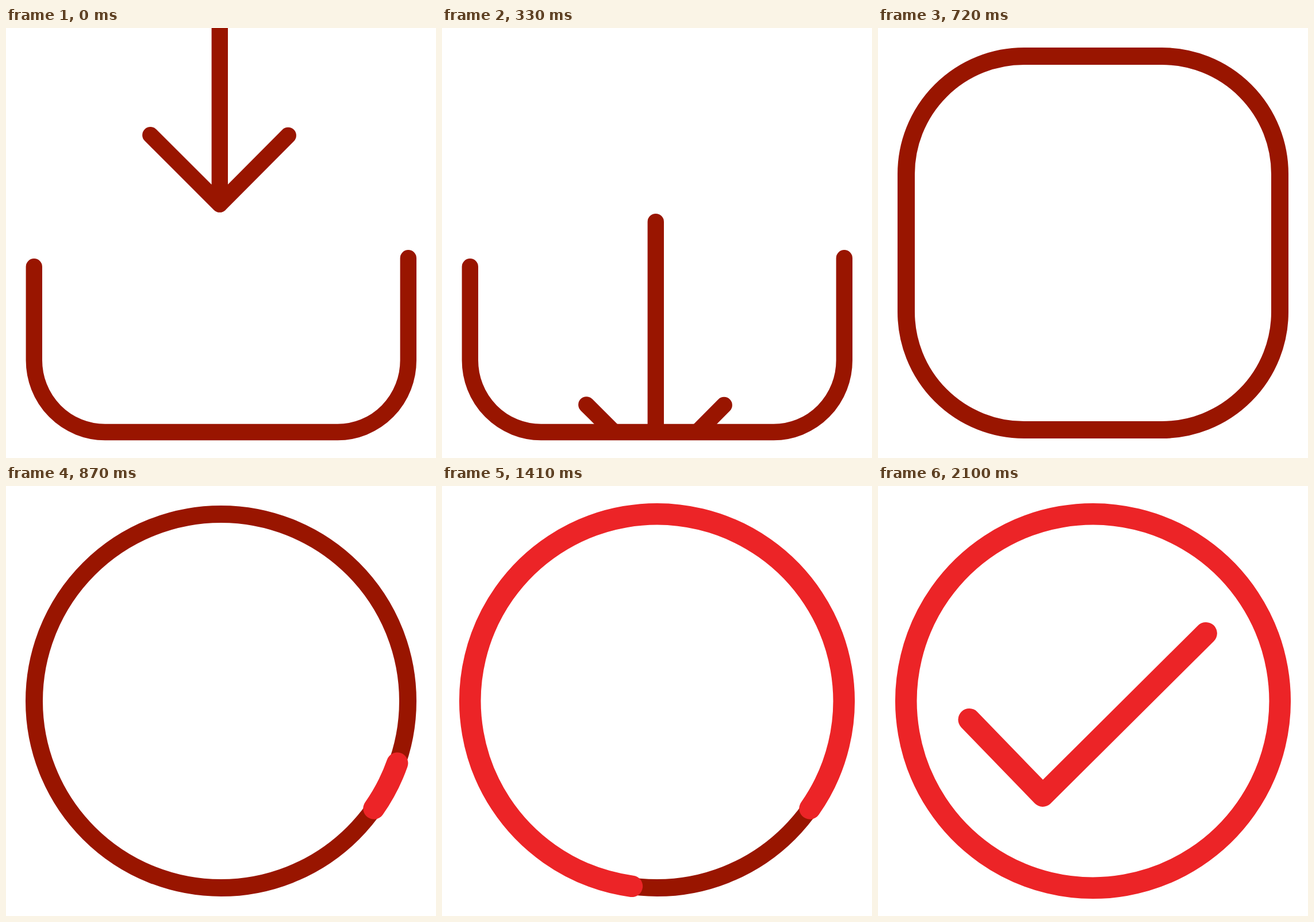
These frames come from a looping animation (748 by 748 pixels, 3.42 s). An HTML page:

```html
<!DOCTYPE html>
<html lang="en">
<head>
<meta charset="utf-8">
<title>Download complete</title>
<style>
  html, body { margin: 0; width: 100%; height: 100%; overflow: hidden; background: #fff; }
  svg { display: block; width: 100vw; height: 100vh; }
  .line { fill: none; stroke-linecap: round; stroke-linejoin: round; }
  .dark { stroke: #991500; }
  .red { stroke: #ec2427; }
</style>
</head>
<body>
<svg viewBox="0 0 748 748">
  <clipPath id="above"><rect width="748" height="703"/></clipPath>
  <g clip-path="url(#above)">
    <path id="arrow" class="line dark" stroke-width="28.4"
      d="M371.8 -132V306.6M251.3 186.2L371.8 306.6L490.7 186.9"/>
  </g>
  <path id="tray" class="line dark" stroke-width="28.4"
    d="M48.8 415.2V578A123.4 125 0 0 0 172.2 703H577A122.8 125 0 0 0 699.8 578V400.2"/>
  <path id="trace" class="line dark" stroke-width="30" pathLength="1"
    d="M699 400V164A115 115 0 0 0 584 49H164A115 115 0 0 0 49 164V584A115 115 0 0 0 164 699H584A115 115 0 0 0 699 584Z"/>
  <rect id="frame" class="line dark" stroke-width="30" x="49" y="49" width="650" height="650"/>
  <circle id="disc" class="line red" stroke-width="37.6" cx="374" cy="374" r="325.2"
    pathLength="360" transform="rotate(35.1 374 374) matrix(1 0 0 -1 0 748)"/>
  <path id="tick" class="line red" stroke-width="38.8" d="M158.8 406.4L286.6 538.5L570.5 256.3"/>
</svg>
<script>
  const LOOP = 3420, STEP = 30;
  const FALL = 844.5;
  const SHORT = 183.8, LONG = 400.3;

  const $ = id => document.getElementById(id);
  const [arrow, tray, trace, frame, disc, tick] =
    ['arrow', 'tray', 'trace', 'frame', 'disc', 'tick'].map($);

  const span = (t, from, to) => Math.min(1, Math.max(0, (t - from) / (to - from)));
  const show = (el, on) => el.setAttribute('visibility', on ? 'visible' : 'hidden');

  // Closed form of cubic-bezier(2/3, 0, 1, 1)
  function easeIn(x) {
    const s = 1 - Math.sqrt(1 - x);
    return s * s * (3 - 2 * s);
  }

  // Reveal the first part of a stroke
  function draw(el, length, total) {
    show(el, length > 0);
    el.setAttribute('stroke-dasharray', length < total ? `${length} ${total * 2}` : 'none');
  }

  function render(t) {
    show(arrow, t < 420);
    arrow.setAttribute('transform', `translate(0 ${FALL * easeIn(span(t, 0, 420))})`);
    show(tray, t < 630);

    draw(trace, t < 630 ? span(t, 450, 630) : 0, 1);
    show(frame, t >= 630 && t < 1530);
    frame.setAttribute('rx', 115 + 210 * span(t, 630, 840));

    draw(disc, 360 * span(t, 840, 1530), 360);
    draw(tick, SHORT * span(t, 1770, 1860) + LONG * span(t, 1890, 2100), SHORT + LONG);
  }

  const start = performance.now();
  function loop() {
    const t = (performance.now() - start) % LOOP;
    render(Math.floor(t / STEP) * STEP);
    requestAnimationFrame(loop);
  }
  loop();
</script>
</body>
</html>
```
